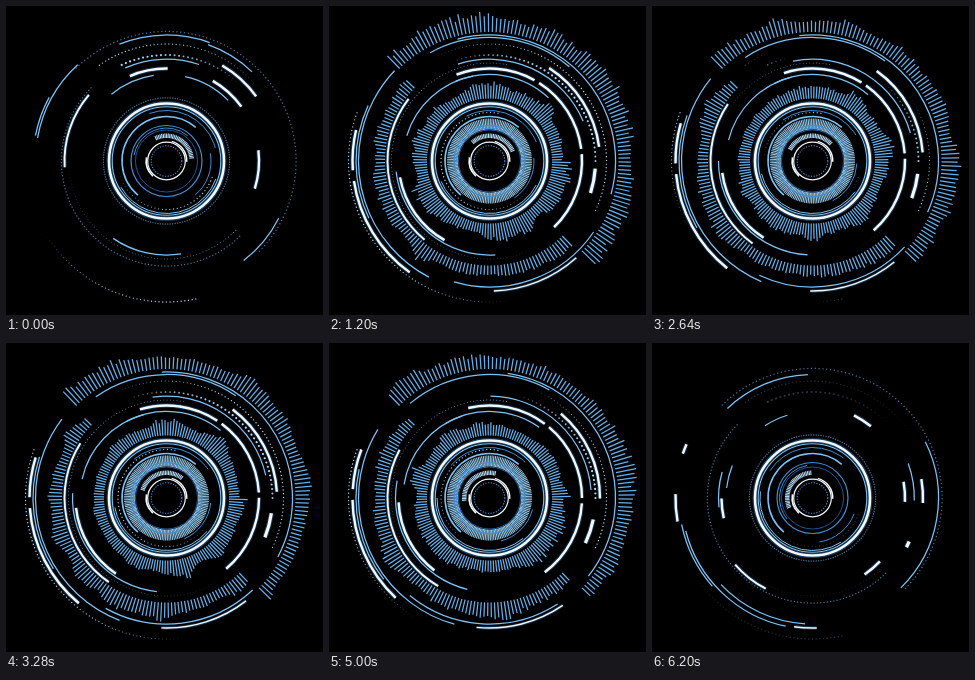
Recreate the animation shown at these times as an HTML page with a canvas. Size 317x309 px, loop 6240 ms.

```html
<!DOCTYPE html>
<html lang="en">
<head>
<meta charset="utf-8">
<title>Radial display</title>
<style>
html, body { margin: 0; width: 100%; height: 100%; overflow: hidden; background: #000; }
canvas { display: block; width: 317px; height: 309px; }
</style>
</head>
<body>
<canvas id="stage" width="317" height="309"></canvas>
<script>
const ctx = document.getElementById('stage').getContext('2d');
const LOOP = 6240, STEP = 40, REF = 2.64;
const CX = 160.5, CY = 155, RAD = Math.PI / 180;
const WHITE = '#f2faff', SKY = '#7cc3f7', BLUE = '#3f8fd6', DEEP = '#1d5596';

const clamp = x => Math.max(0, Math.min(1, x));
const smooth = x => x * x * (3 - 2 * x);
const mix = (a, b, k) => a + (b - a) * k;
const easeOut = x => 1 - Math.pow(1 - clamp(x), 2.2);
const leaving = t => smooth(clamp((t - 5.3) / .9));

function hash(a, b) {
  const n = Math.sin(a * 12.9898 + b * 78.233) * 43758.5453;
  return n - Math.floor(n);
}

function noise(x, y) {
  const i = Math.floor(x), j = Math.floor(y);
  const u = smooth(x - i), v = smooth(y - j);
  return mix(mix(hash(i, j), hash(i + 1, j), u),
             mix(hash(i, j + 1), hash(i + 1, j + 1), u), v);
}

function arc(r, w, a, b, color) {
  ctx.strokeStyle = color;
  ctx.lineWidth = w;
  ctx.beginPath();
  ctx.arc(CX, CY, r, Math.min(a, b) * RAD, Math.max(a, b) * RAD);
  ctx.stroke();
}

function spoke(r0, r1, angle) {
  const c = Math.cos(angle * RAD), s = Math.sin(angle * RAD);
  ctx.moveTo(CX + r0 * c, CY + r0 * s);
  ctx.lineTo(CX + r1 * c, CY + r1 * s);
}

// An arc that grows from its tail, turns, then shrinks into its head.
function sweep(t, r, tail, span, speed, w, color, first, last) {
  const turn = speed * (t - REF);
  const a = tail + turn + span * (1 - mix(1, last, leaving(t)));
  const b = tail + turn + span * mix(first, 1, easeOut(t / .8));
  if (Math.abs(b - a) < .2) return;
  if (color === WHITE) {
    ctx.globalAlpha = .35;
    arc(r, w + 2, a, b, BLUE);
    ctx.globalAlpha = 1;
  }
  arc(r, w, a, b, color);
}

// Heavy arcs drift slowly; those that begin below the axis enter late.
function bold(t, r, tail, span = 50, w = 2.4) {
  sweep(t, r, tail, span, 2, w, WHITE, tail > 0 ? 0 : .48, .25);
}

// Light arcs turn in the direction of their span, faster when farther out.
function light(t, r, tail, span, w = 1.25, color = SKY) {
  const speed = span > 0 ? .048 * r : -.024 * r;
  const outer = r > 110;
  sweep(t, r, tail, span, speed, w, color, outer ? .35 : .5, outer ? .6 : .25);
}

function arcs(t) {
  light(t, 123.5, -54, -69);
  light(t, 126, -96, 120);
  light(t, 126, 43, 72);
  light(t, 131, 219, -106);
  light(t, 133.5, 200, -50);
  light(t, 101.8, -101, 85);
  light(t, 94, 93, 87);
  light(t, 86.5, 256, -62);
  light(t, 86.5, -50, -66);
  light(t, 102, 214, -88, 1.9, WHITE);

  for (let i = 0; i < 3; i++) bold(t, 92.5, -108 + 53.3 * i);
  bold(t, 110.5, -54.5);
  bold(t, 91, 122.5);
  bold(t, 137, 128.5, 46);
  bold(t, 137, 179, 17);
  bold(t, 106, 7, 13.5, 3.2);
  bold(t, 130, 51, 40, 1.4);
}

// A row of dots lit by a wave that runs from one end to the other.
function dots(t, r, from, to, size) {
  const count = Math.round(Math.abs(to - from) * RAD * r / (2.3 + size));
  const dim = 1 - .75 * leaving(t);
  ctx.fillStyle = size > 1 ? '#b4e0ff' : SKY;
  for (let i = 0; i <= count; i++) {
    const k = i / count;
    const x = (t * 3000 / LOOP + 1.95 - .55 * k) % 1;
    if (x > .72) continue;
    const glow = Math.sqrt(Math.sin(Math.PI * x / .72));
    const a = mix(from, to, k) * RAD;
    ctx.globalAlpha = glow * dim;
    ctx.beginPath();
    ctx.arc(CX + r * Math.cos(a), CY + r * Math.sin(a), size * (.5 + .5 * glow) / 2, 0, 7);
    ctx.fill();
  }
  ctx.globalAlpha = 1;
}

// Level bars standing on a circle; at rest they are a row of dots.
function bars(t, r, from, to, low, high, grow) {
  const count = Math.round((to - from) * RAD * r / (1.2 + r / 50));
  ctx.strokeStyle = '#66b0ea';
  ctx.lineWidth = 1.25;
  ctx.globalAlpha = mix(.65, 1, grow);
  ctx.beginPath();
  for (let i = 0; i < count; i++) {
    const lump = smooth(noise(i / 6 + r, t * 2.5));
    const jitter = noise(i * 7 + r, t * 5);
    const level = .6 * lump + .4 * jitter;
    spoke(r, r + 1.2 + grow * mix(low, high, level * level), mix(from, to, (i + .5) / count));
  }
  ctx.stroke();
  ctx.globalAlpha = 1;
}

function ticks(r0, r1, from, to, step, color) {
  ctx.strokeStyle = color;
  ctx.lineWidth = 1.1;
  ctx.beginPath();
  for (let a = from; a < to; a += step) spoke(r0, r1, a);
  ctx.stroke();
}

function core(t, grow) {
  if (grow > .02) ticks(31.5, 31.5 + 11 * grow, 0, 360, 2.4, '#94c6e4');
  arc(35.5, 1.2, 0, 360, BLUE);
  arc(31, 1, 0, 360, DEEP);
  arc(33, 1, 190 - 8 * t, 310 - 8 * t, BLUE);

  arc(44.5, 1.5, 130, 311, SKY);
  arc(44.5, 1, -10 + 5 * t, 50 + 5 * t, BLUE);
  arc(50.5, 1, 250 - 6 * t, 345 - 6 * t, BLUE);
  arc(52.5, 1, 20 + 6 * t, 150 + 6 * t, SKY);
  arc(54.3, 1.1, 0, 360, SKY);
  ctx.globalAlpha = .4;
  arc(57.5, 5, 0, 360, BLUE);
  ctx.globalAlpha = 1;
  arc(57.5, 2.6, 0, 360, WHITE);

  ticks(23, 27.5, -115 - 14 * t, -4 - 14 * t, 3.6, '#b5dcf6');
  arc(18.8, 1.2, 0, 360, WHITE);
  arc(20.3, 1.7, 132, 190, WHITE);
  arc(20.3, 1.5, 285, 362, WHITE);
  ctx.setLineDash([1.2, 1.5]);
  arc(15.3, 1.1, 0, 360, BLUE);
  ctx.setLineDash([]);
}

function draw(ms) {
  const t = ms / 1000;
  const grow = easeOut(t) * (1 - leaving(t + .05));
  ctx.fillStyle = '#000';
  ctx.fillRect(0, 0, 317, 309);

  bars(t, 129, -135, 45, 9, 21, grow);
  bars(t, 104.5, 45, 225, 7, 20, grow);
  bars(t, 62.5, 0, 360, 8, 22, grow);

  dots(t, 117, 25, -125, 1.4);
  dots(t, 106, 0, -115, 2.2);
  dots(t, 141, 200, 78, 1.4);
  dots(t, 98, 280, 45, 1);
  dots(t, 48.5, 280, 20, 1.4);

  arcs(t);
  core(t, grow);
}

const start = performance.now();
function tick() {
  const ms = Math.max(0, performance.now() - start) % LOOP;
  draw(Math.floor(ms / STEP) * STEP);
  requestAnimationFrame(tick);
}
tick();
</script>
</body>
</html>
```
